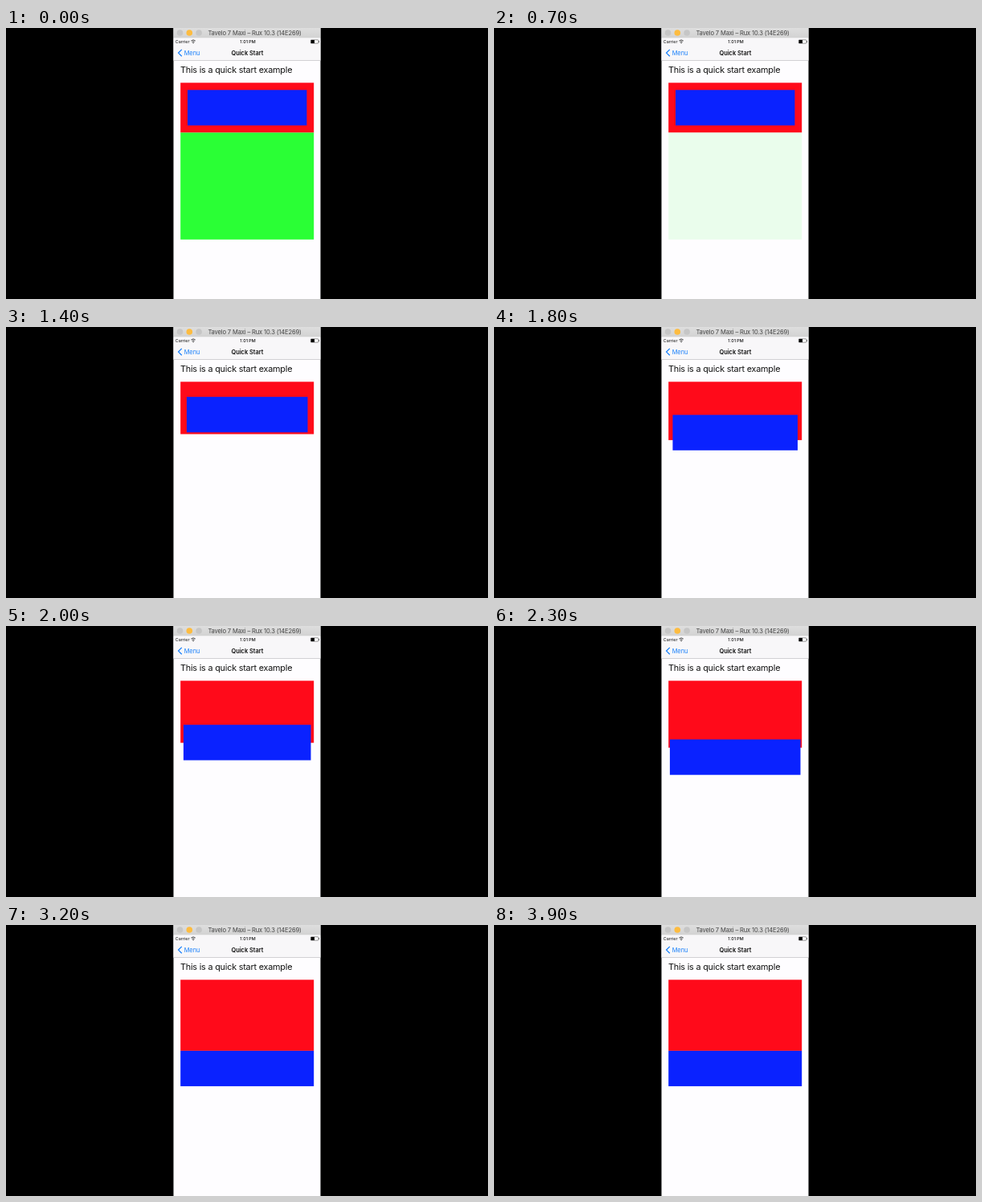
Write an HTML page that moves like this. It is 600 by 338 pixels and loops after 4000 ms.

```html
<!DOCTYPE html>
<html lang="en">
<head>
<meta charset="utf-8">
<title>Quick Start</title>
<style>
  html, body { margin: 0; width: 100%; height: 100%; overflow: hidden; background: #000; }
  svg { display: block; width: 100%; height: 100%; }
  text { font-family: Inter, Roboto, sans-serif; fill: #111; }
  .window { font-size: 7.6px; letter-spacing: -.16px; fill: #444; text-anchor: middle; }
  .status { font-size: 5.4px; }
  .time { font-weight: 500; text-anchor: middle; }
  .nav { font-size: 7.4px; }
  .heading { font-weight: 600; text-anchor: middle; }
  .back { fill: #1a80fa; }
  .title { font-size: 10.8px; letter-spacing: -.2px; }
</style>
</head>
<body>
<svg viewBox="0 0 600 338">
  <defs>
    <linearGradient id="bar" x2="0" y2="1">
      <stop offset="0" stop-color="#dedede"/>
      <stop offset="1" stop-color="#d2d2d2"/>
    </linearGradient>
  </defs>
  <rect width="600" height="338"/>
  <rect x="208.5" width="183" height="338" fill="#fefdff"/>

  <!-- window bar -->
  <rect x="208.5" width="183" height="12.6" fill="url(#bar)"/>
  <circle cx="216.5" cy="6" r="3.8" fill="#c6c6c6"/>
  <circle cx="228.3" cy="6" r="3.8" fill="#fdbc40"/>
  <circle cx="240.1" cy="6" r="3.8" fill="#c6c6c6"/>
  <text class="window" x="309.5" y="8.8">Tavelo 7 Maxi – Rux 10.3 (14E269)</text>

  <!-- status and navigation bars -->
  <rect x="208.5" y="12.6" width="183" height="28" fill="#f8f7f9"/>
  <rect x="208.5" y="40.4" width="183" height=".5" fill="#a9a9ac"/>
  <text class="status" x="210.8" y="18.9">Carrier</text>
  <g fill="none" stroke="#222" stroke-width=".8">
    <path d="M230.4 16q2.7-2.4 5.4 0M231.5 17.3q1.6-1.4 3.2 0"/>
    <circle cx="233.1" cy="18.6" r=".4"/>
  </g>
  <text class="status time" x="301" y="18.9">1:01 PM</text>
  <rect x="379.3" y="14.8" width="9.6" height="4.4" rx=".8" fill="#fff" stroke="#333" stroke-width=".5"/>
  <rect x="379.6" y="15" width="4.4" height="4" fill="#000"/>
  <rect x="389.3" y="16.2" width=".7" height="1.6" fill="#333"/>
  <path d="M218.8 26.9l-4.2 4.2 4.2 4.2" fill="none" stroke="#1a80fa" stroke-width="1.3"/>
  <text class="nav back" x="221.7" y="33.7">Menu</text>
  <text class="nav heading" x="300.4" y="33.7">Quick Start</text>

  <text class="title" x="217" y="56.3">This is a quick start example</text>
  <rect id="green" x="217.2" y="130.3" width="166" height="133.5" fill="#27ff32"/>
  <rect id="red" x="217.2" y="68.3" width="166" height="62" fill="#ff0a1a"/>
  <rect id="blue" x="226" y="77.3" width="148.4" height="44.2" fill="#0a22ff"/>
</svg>
<script>
  const LOOP = 4000, STEP = 100, MOVE_AT = 910;
  const [green, red, blue] = ['green', 'red', 'blue'].map(id => document.getElementById(id));
  const mix = (a, b, p) => a + (b - a) * p;

  // cubic-bezier(.42, 0, .58, 1), solved by bisection
  function easeInOut(x) {
    x = Math.min(1, Math.max(0, x));
    let lo = 0, hi = 1;
    for (let i = 0; i < 24; i++) {
      const s = (lo + hi) / 2, r = 1 - s;
      if (1.26 * s * r * r + 1.74 * s * s * r + s * s * s < x) lo = s;
      else hi = s;
    }
    return lo * lo * (3 - 2 * lo);
  }

  function draw(now) {
    const t = Math.floor(now % LOOP / STEP) * STEP;
    const fade = easeInOut((t - MOVE_AT + 1000) / 1000);
    const move = easeInOut((t - MOVE_AT) / 2000);
    const inset = mix(8.8, 0, move);

    green.setAttribute('opacity', 1 - fade);
    red.setAttribute('height', mix(62, 88.6, move));
    blue.setAttribute('x', 217.2 + inset);
    blue.setAttribute('width', 166 - 2 * inset);
    blue.setAttribute('y', mix(77.3, 156.9, move));
  }

  function tick() {
    draw(performance.now());
    requestAnimationFrame(tick);
  }
  tick();
</script>
</body>
</html>
```
